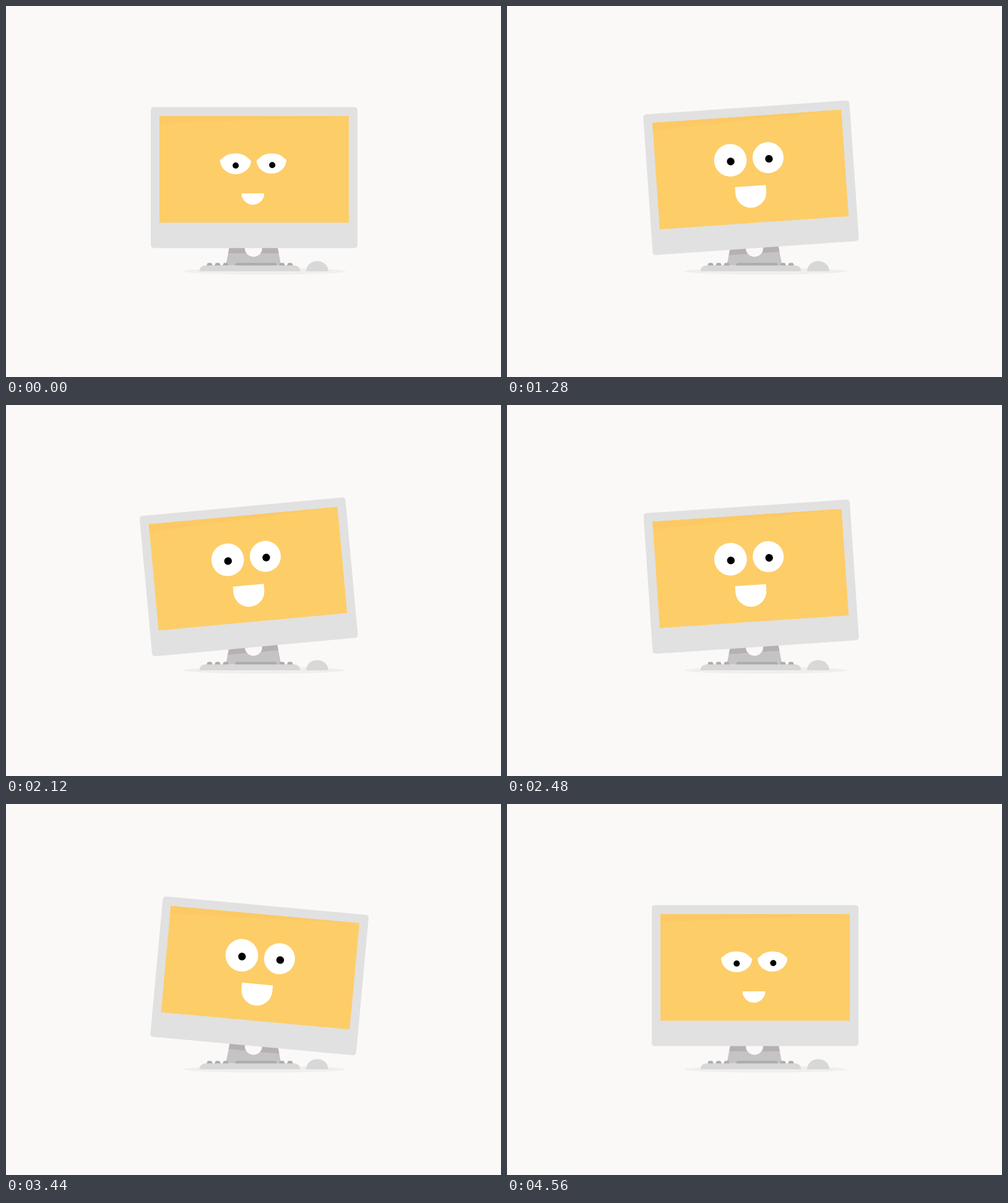
Write an HTML page that moves like this. It is 800x600 px and loops after 5.2 s.

```html
<!DOCTYPE html>
<html lang="en">
<head>
<meta charset="utf-8">
<title>Happy computer</title>
<style>
  html, body { margin: 0; width: 100%; height: 100%; overflow: hidden; background: #faf9f8; }
  svg { display: block; width: 800px; height: 600px; }
</style>
</head>
<body>
<svg viewBox="0 0 800 600">
  <defs>
    <clipPath id="standShape"><path d="M363 380H437L444.5 419.5H355.2Z"/></clipPath>
    <path id="key" d="M-5 420L-3 415.5H3L5 420Z"/>
  </defs>

  <ellipse cx="418" cy="429" rx="131" ry="5.5" fill="#f0efed"/>
  <g clip-path="url(#standShape)">
    <rect x="350" y="375" width="100" height="50" fill="#c6c3c4"/>
    <rect class="tilt" x="330" y="370" width="142" height="30" fill="#b6b1b1"/>
  </g>
  <circle cx="400" cy="391.7" r="14" fill="#faf9f8"/>

  <g fill="#acabab">
    <use href="#key" x="329"/>
    <use href="#key" x="342"/>
    <use href="#key" x="355"/>
    <use href="#key" x="446"/>
    <use href="#key" x="459"/>
    <path d="M369.5 420L372 415.5H436L438.5 420Z"/>
  </g>
  <g fill="#d8d8d8">
    <path d="M312.5 429A9.5 9.5 0 0 1 322 419.5H466A9.5 9.5 0 0 1 475.5 429Z"/>
    <path d="M485 429A18 16.5 0 0 1 521 429Z"/>
  </g>

  <g class="tilt">
    <rect x="234" y="163.5" width="334" height="228" rx="5" fill="#e1e1e1"/>
    <rect x="248" y="178" width="306" height="172.5" fill="#fdcd68"/>
    <path d="M248 178H554L248 190.5Z" fill="#fcc964"/>
    <g fill="#fff">
      <path id="leftEye"/>
      <path id="rightEye"/>
      <path id="mouth"/>
    </g>
    <circle id="leftPupil"/>
    <circle id="rightPupil"/>
  </g>
</svg>
<script>
const LOOP = 5200, STEP = 40;
const SHAKE = { start: 398.4, swing: 105.85, swings: 32, angle: 8.05 };
const PIVOT = '401 372';

// Each pair holds the calm and the excited pose.
// eye: centre x, half width, left y, right y, top, bottom, corner inset
const POSES = {
  leftEye: [[371, 25, 249.3, 250.2, 238.4, 272, 7], [369.6, 26.3, 247, 247, 220.7, 273.3, 0]],
  rightEye: [[429.1, 24, 250, 249, 238.6, 271, 7], [430.7, 25, 247, 247, 222, 272, 0]],
  leftPupil: [[371.2, 258, 5], [370, 249, 6.2]],
  rightPupil: [[430.3, 257.2, 5], [432, 249, 6.2]],
  mouth: [[18.4, 303, 0], [25, 291, 10]],
};

const $ = id => document.getElementById(id);
const tilted = document.querySelectorAll('.tilt');
const clamp = x => Math.min(1, Math.max(0, x));
const ease = x => x * x * (3 - 2 * x);
const lerp = (a, b, p) => a + (b - a) * p;

function eyePath([x, w, yl, yr, top, bottom, inset]) {
  const k = 0.552, l = x - w, r = x + w, kw = k * w;
  return `M${l} ${yl}C${l + inset} ${lerp(yl, top, k)} ${x - kw} ${top} ${x} ${top}` +
    `S${r - inset} ${lerp(yr, top, k)} ${r} ${yr}` +
    `C${r} ${lerp(yr, bottom, k)} ${x + kw} ${bottom} ${x} ${bottom}` +
    `S${l} ${lerp(yl, bottom, k)} ${l} ${yl}Z`;
}

function mouthPath([w, top, side]) {
  return `M${399 - w} ${top}h${2 * w}v${side}a${w} ${w} 0 0 1 ${-2 * w} 0Z`;
}

// Eased swings between alternating extremes, upright at both ends
function shakeAngle(t) {
  const pos = (t - SHAKE.start) / SHAKE.swing, i = Math.floor(pos);
  const extreme = n => n <= 0 || n >= SHAKE.swings ? 0 : n % 2 ? SHAKE.angle : -SHAKE.angle;
  return lerp(extreme(i), extreme(i + 1), ease(pos - i));
}

function draw(t) {
  const joy = ease(clamp((t - 400) / 560)) - ease(clamp((t - 4000) / 560));
  const pose = name => POSES[name][0].map((v, i) => lerp(v, POSES[name][1][i], joy));

  tilted.forEach(el => el.setAttribute('transform', `rotate(${shakeAngle(t)} ${PIVOT})`));
  for (const side of ['left', 'right']) {
    $(side + 'Eye').setAttribute('d', eyePath(pose(side + 'Eye')));
    const pupil = pose(side + 'Pupil');
    ['cx', 'cy', 'r'].forEach((attr, i) => $(side + 'Pupil').setAttribute(attr, pupil[i]));
  }
  $('mouth').setAttribute('d', mouthPath(pose('mouth')));
}

const begin = performance.now();
function tick() {
  const t = (performance.now() - begin) % LOOP;
  draw(Math.floor(t / STEP) * STEP);
  requestAnimationFrame(tick);
}
tick();
</script>
</body>
</html>
```
